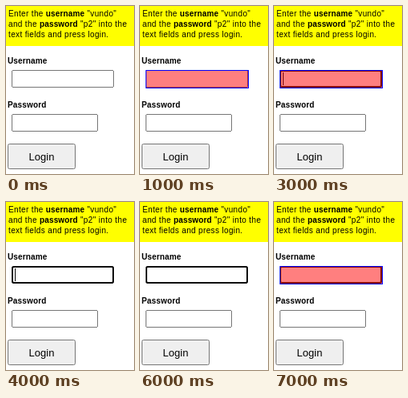
An HTML page for the animation above (8 s loop, 160 by 210 pixels).

```html
<!DOCTYPE html>
<html lang="en">
<head>
<meta charset="utf-8">
<title>Login form</title>
<style>
  html, body { margin: 0; width: 100%; height: 100%; overflow: hidden; background: #fff; }
  body { position: relative; font: 10px/13px "Liberation Sans", Arial, sans-serif; letter-spacing: .35px; color: #000; }
  body > * { position: absolute; }

  .task { left: 0; top: 0; width: 160px; height: 50px; padding: 3px; box-sizing: border-box; background: #ff0; white-space: nowrap; }
  b, label { font-weight: bold; letter-spacing: .15px; }
  label { left: 2px; }
  input { left: 7px; height: 16px; margin: 0; padding: 1px 2px; pointer-events: none; }
  button { left: 2px; top: 172px; width: 85px; height: 32px; margin: 0; padding: 0; pointer-events: none; }
  input, button { font: 13px "Liberation Sans", Arial, sans-serif; letter-spacing: normal; }

  .user { top: 62px; }
  .pass { top: 117px; }
  #user { top: 80px; width: 120px; }
  #pass { top: 135px; width: 100px; }

  .ring, .mark { left: 7px; top: 80px; box-sizing: border-box; }
  .ring { width: 128px; height: 22px; border: 2px solid #101010; border-radius: 3px; animation: ring 8s step-end infinite; }
  .caret { left: 11px; top: 83px; width: 1px; height: 16px; background: #000; animation: caret 8s step-end infinite; }
  .mark { width: 129px; height: 23px; border: 1px solid #00f; background: rgba(255, 0, 0, .5) padding-box; animation: mark 2s step-end infinite; }

  @keyframes ring { 0% { opacity: 0; } 25%, 100% { opacity: 1; } }
  @keyframes caret { 0% { opacity: 0; } 25% { opacity: 1; } 75%, 100% { opacity: 0; } }
  @keyframes mark { 0% { opacity: 0; } 50%, 100% { opacity: 1; } }
</style>
</head>
<body>
  <div class="task">Enter the <b>username</b> "vundo"<br>and the <b>password</b> "p2" into the<br>text fields and press login.</div>

  <label class="user" for="user">Username</label>
  <input id="user" type="text" tabindex="-1" autocomplete="off" readonly>
  <label class="pass" for="pass">Password</label>
  <input id="pass" type="password" tabindex="-1" autocomplete="off" readonly>
  <button type="button" tabindex="-1">Login</button>

  <div class="ring"></div>
  <div class="caret"></div>
  <div class="mark"></div>
</body>
</html>
```
